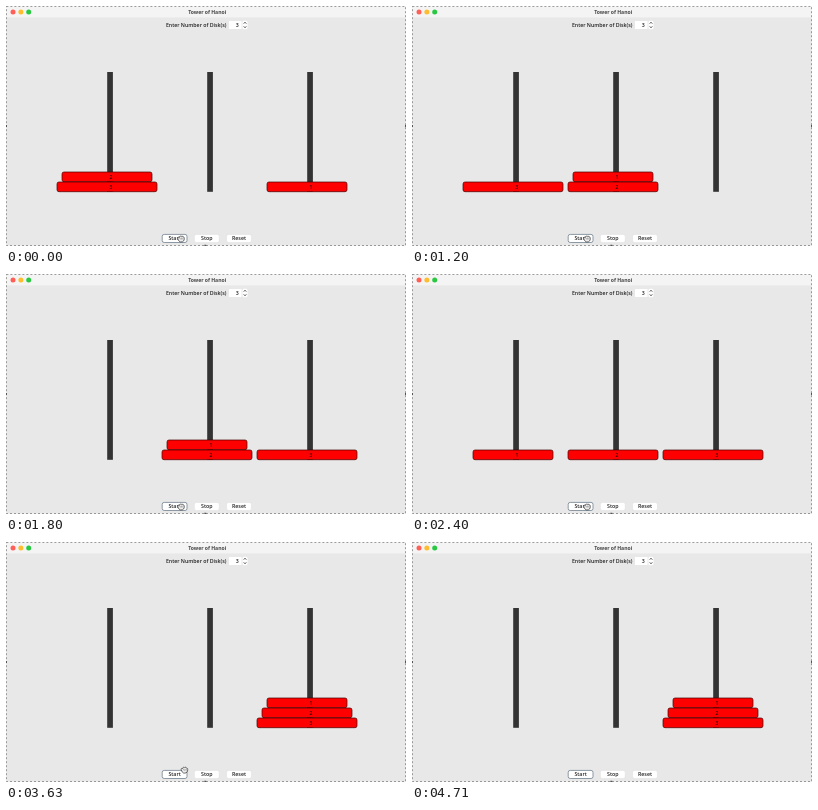
Write an HTML page that moves like this. It is 400 px wide and 240 px high and loops after 4950 ms.

```html
<!DOCTYPE html>
<html lang="en">
<head>
<meta charset="utf-8">
<title>Tower of Hanoi</title>
<style>
  html, body { margin: 0; width: 100%; height: 100%; overflow: hidden; background: #e8e8e8; }
  svg { display: block; width: 400px; height: 240px; }
  text { font: 600 5.25px "Open Sans", "Noto Sans", sans-serif; fill: #222; text-anchor: middle; }
  .title { font-size: 5.1px; font-weight: 700; fill: #444; }
  .disk rect { fill: #f00; stroke: #400; stroke-width: .7; }
  .disk text { font-size: 5px; fill: #300; }
  .button rect { fill: #fff; stroke: #d8d8d8; stroke-width: .4; }
  .focus rect { stroke: #71808e; stroke-width: .8; }
</style>
</head>
<body>
<svg viewBox="0 0 400 240">
  <rect width="400" height="240" fill="#e8e8e8"/>
  <rect width="400" height="11.5" fill="#f5f4f5"/>
  <g id="lights"></g>
  <text class="title" x="201.2" y="7.8">Tower of Hanoi</text>

  <text x="190.2" y="20.7">Enter Number of Disk(s)</text>
  <rect x="223" y="15" width="12.5" height="8" fill="#fff"/>
  <text x="231.2" y="20.8">3</text>
  <rect x="236.5" y="14.7" width="5" height="8.6" rx="1.6" fill="#fff"/>
  <path d="M237.7 17.7 239 16.2 240.3 17.7M237.7 20.3 239 21.8 240.3 20.3" fill="none" stroke="#333" stroke-width=".8"/>

  <g id="poles" fill="#333"></g>
  <g id="disks"></g>
  <g id="buttons"></g>

  <rect x=".4" y=".4" width="399.2" height="239.2" fill="none" stroke="#fff" stroke-opacity=".4" stroke-width=".8"/>
  <rect x=".4" y=".4" width="399.2" height="239.2" fill="none" stroke="#666" stroke-width=".7" stroke-dasharray="2 2"/>
  <path d="M0 119h1v2H0zM399 119h1v2h-1zM198.3 238.8h2v1.2h-2z" fill="#555"/>

  <g id="cursor">
    <path d="M-3.3-.8C-3.2-2-2.2-2-1.7-1.4-1.6-3.2-.1-3.3.2-2.4.7-3.3 1.8-3 1.9-2 2.8-2.4 3.4-1.6 3.3-.6 3.3 1.4 2.6 3-.2 3-1.7 3-2.5 1.6-3.3-.8Z" fill="#eee" stroke="#444" stroke-width=".8"/>
    <path d="M-1.2-1 .1.7M.4-1.4.8.3M1.9-1.1V.4" stroke="#666" stroke-width=".5"/>
  </g>
</svg>
<script>
  const NS = "http://www.w3.org/2000/svg";
  const LOOP = 4950, TICK = 30, MOVE_TIME = 603.5;
  const GLIDE_START = 3630, GLIDE_STEP = 60, GLIDE_STEPS = 5, HIDE = 4710;
  const SIZE = 3, PEG_GAP = 100;

  const find = id => document.getElementById(id);
  const cursor = find("cursor");

  function add(parent, tag, attrs) {
    const node = document.createElementNS(NS, tag);
    for (const key in attrs) node.setAttribute(key, attrs[key]);
    return parent.appendChild(node);
  }

  function label(parent, words, x, y) {
    add(parent, "text", { x, y }).textContent = words;
  }

  function place(node, x, y) {
    node.setAttribute("transform", `translate(${x} ${y})`);
  }

  function makeDisk(number) {
    const width = 70 + number * 10;
    const group = add(find("disks"), "g", { class: "disk" });
    add(group, "rect", { x: -width / 2, y: 0, width, height: 9.7, rx: 2 });
    label(group, number, 4, 6.5);
    return group;
  }

  ["#fe5f57", "#febc2e", "#28c840"].forEach((fill, i) =>
    add(find("lights"), "circle", { cx: 7 + i * 7.85, cy: 6, r: 2.5, fill }));

  ["Start", "Stop", "Reset"].forEach((words, i) => {
    const group = add(find("buttons"), "g", { class: i ? "button" : "button focus" });
    const x = 168.6 + i * 32.2;
    add(group, "rect", { x: x - 12.4, y: 228.4, width: 24.8, height: 8.1, rx: 2 });
    label(group, words, x, 234.1);
  });

  for (let peg = 0; peg < 3; peg++)
    add(find("poles"), "rect", { x: 101.2 + peg * PEG_GAP, y: 66, width: 5.7, height: 119.8 });

  const disks = Array.from({ length: SIZE }, (_, i) => makeDisk(i + 1));

  // Classic recursive solution: a list of { disk, to }.
  function solve(count, from, to, spare) {
    if (!count) return [];
    return [
      ...solve(count - 1, from, spare, to),
      { disk: count - 1, to },
      ...solve(count - 1, spare, to, from)
    ];
  }
  const moves = solve(SIZE, 0, 2, 1);
  const moveStart = i => Math.round(i * MOVE_TIME / TICK) * TICK;

  function drawDisks(time) {
    const pegs = Array(SIZE).fill(0);
    moves.forEach((move, i) => {
      if (moveStart(i) <= time) pegs[move.disk] = move.to;
    });
    pegs.forEach((peg, i) => {
      const level = pegs.filter((other, j) => j > i && other === peg).length;
      place(disks[i], 101 + peg * PEG_GAP, 176 - level * 10);
    });
  }

  // The pointer rests on the button, then glides away in a few hard steps.
  function drawCursor(time) {
    const step = Math.floor((time - GLIDE_START) / GLIDE_STEP + 0.5) + 1;
    const part = time < GLIDE_START ? 0 : Math.min(1, step / GLIDE_STEPS);
    place(cursor, 175 + 17 * part, 233 - 13.5 * (1 - (1 - part) ** 2));
    cursor.setAttribute("visibility", time < HIDE ? "visible" : "hidden");
  }

  const start = performance.now();
  function tick() {
    const time = (performance.now() - start) % LOOP;
    drawDisks(time);
    drawCursor(time);
    requestAnimationFrame(tick);
  }
  tick();
</script>
</body>
</html>
```
